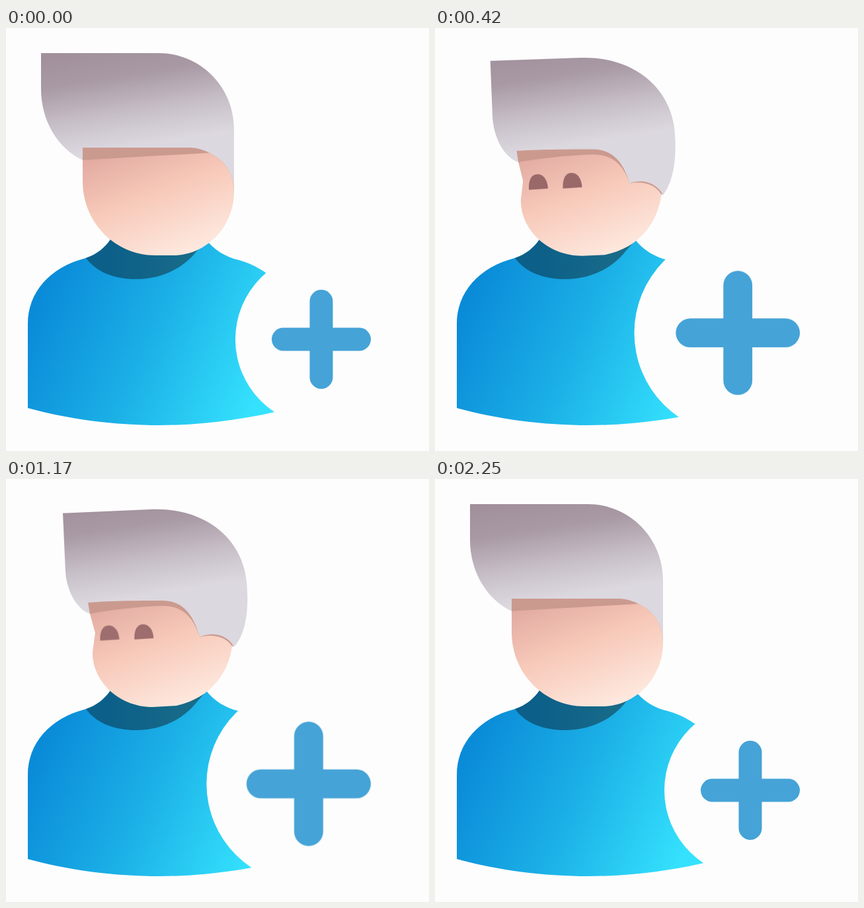
These frames come from a looping animation (640x640 px, 2.33 s). An HTML page without scripts:

```html
<!DOCTYPE html>
<html lang="en">
<head>
<meta charset="utf-8">
<title>Add user</title>
<style>
html, body { margin: 0; width: 100%; height: 100%; overflow: hidden; background: #fdfdfd; }
svg { display: block; width: 100%; height: 100%; }
.hair, .fringe, .skin, .bite, .plus, .eye { animation: 2330ms infinite; }
.hair { animation-name: hair; }
.fringe { animation-name: fringe; }
.skin { animation-name: skin; }
.bite { animation-name: bite; fill: #fdfdfd; }
.plus { animation-name: plus; transform-origin: 552px 509.5px; stroke: #45a3d7; stroke-width: 35; stroke-linecap: round; }
.eye { fill: #996869; transform-box: fill-box; transform-origin: 50% 100%; }
.left { animation-name: left; }
.right { animation-name: right; }

/* rest, turning, turned, turning back, rest */
@keyframes hair {
  0%, 71%, 100% { d: path("M53 38L231 38C294 38 345 89 345 153C345 190 345 220 345 248L230 260L116 200C78 182 53 140 53 92Z"); animation-timing-function: ease-in; }
  10.73% { d: path("M74 41L226 41C298 41 357 95 357 165C357 195 352 225 345 247L230 260L123 199C92 185 74 150 74 98Z"); animation-timing-function: ease-out; }
  22.5%, 49.5% { d: path("M86 52L218 46C302 42 365 92 365 170C367 208 360 238 345 254L230 260L127 204C105 197 91 165 90 140Z"); animation-timing-function: ease-in; }
  57.1% { d: path("M86 43L225 43C302 42 364 93 364 168C364 204 357 235 344 254L230 260L128 199C100 188 86 150 86 100Z"); animation-timing-function: ease-in-out; }
}
@keyframes fringe {
  0%, 71%, 100% { d: path("M116 181C170 181 230 181 278 181C290 181 302 185 313 192C332 202 345 222 345 248L230 260L116 201Z"); animation-timing-function: ease-in; }
  10.73% { d: path("M121 181C160 181 210 181 247 181C275 181 290 190 301 219C318 215 335 227 345 247L230 260L123 200Z"); animation-timing-function: ease-out; }
  22.5%, 49.5% { d: path("M124 187C160 184 210 184 238 184C268 185 283 205 293 239C312 231 333 235 344 252L230 260L127 204Z"); animation-timing-function: ease-in; }
  57.1% { d: path("M124 181C160 181 215 181 250 181C275 182 288 200 301 235C318 228 336 237 344 253L230 260L128 200Z"); animation-timing-function: ease-in-out; }
}
@keyframes skin {
  0%, 71%, 100% { d: path("M116 200C180 196 250 192 307 189C309 190 311 191 313 192C332 202 345 222 345 248C345 301 303 344 253 344L226 344C165 344 116 294 116 232L116 216Z"); animation-timing-function: ease-in; }
  10.73% { d: path("M123 199C160 195 215 190 250 190C280 191 292 201 301 219C318 217 335 229 345 247C340 298 302 343 253 344L226 344C170 344 125 304 125 252L126 225Z"); animation-timing-function: ease-out; }
  22.5%, 49.5% { d: path("M127 204C160 198 210 192 240 192C270 193 284 212 293 239C312 234 333 238 342 253C337 290 314 330 258 343L222 345C168 345 130 303 131 262L135 233Z"); animation-timing-function: ease-in; }
  57.1% { d: path("M128 199C165 194 220 190 248 190C275 191 289 208 301 235C318 231 335 240 343 254C338 296 300 342 253 344L226 344C170 344 128 302 129 260L132 228Z"); animation-timing-function: ease-in-out; }
}
@keyframes bite {
  0%, 66%, 100% { cx: 479px; cy: 471px; r: 132px; animation-timing-function: ease-in-out; }
  10.73% { cx: 457px; cy: 462px; r: 158px; animation-timing-function: ease-in-out; }
  22.5%, 48.5% { cx: 455px; cy: 461px; r: 152.5px; animation-timing-function: ease-in-out; }
}
@keyframes plus {
  0%, 66%, 100% { transform: none; animation-timing-function: ease-in-out; }
  20.5%, 48.5% { transform: scale(1.26); animation-timing-function: ease-in-out; }
  1.5% { transform: none; animation-timing-function: ease-in-out; }
}
@keyframes left {
  0%, 10.8%, 63%, 100% { transform: translate(6px, -4px) rotate(4deg) scaleY(0); fill: #d0a096; }
  19%, 49.5% { transform: none; fill: #996869; }
  28.8% { transform: translate(-1px, -1px); fill: #996869; }
  57.1% { transform: translate(5px, -4px) rotate(4deg) scaleY(.55); fill: #cf9f95; }
}
/* winks while turned */
@keyframes right {
  0%, 10.8%, 63%, 100% { transform: translate(9px, -2px) rotate(4deg) scaleY(0); fill: #d0a096; }
  19%, 22%, 45%, 49.5% { transform: none; fill: #996869; }
  28.8%, 35% { transform: translate(-1px, -4px) scaleY(.17); fill: #996869; }
  57.1% { transform: translate(9px, -2px) rotate(4deg) scaleY(.55); fill: #cf9f95; }
}
</style>
</head>
<body>
<svg viewBox="0 0 640 640">
  <defs>
    <linearGradient id="hairFill" gradientUnits="userSpaceOnUse" x1="0" y1="40" x2="31" y2="235">
      <stop offset="0" stop-color="#9f8e99"/>
      <stop offset=".3" stop-color="#a899a4"/>
      <stop offset=".6" stop-color="#c8c0c9"/>
      <stop offset=".85" stop-color="#dcd8df"/>
    </linearGradient>
    <linearGradient id="skinFill" gradientUnits="userSpaceOnUse" x1="0" y1="245" x2="66.4" y2="420">
      <stop offset="0" stop-color="#e2aaa1"/>
      <stop offset=".45" stop-color="#f7c9b9"/>
      <stop offset="1" stop-color="#fee9df"/>
    </linearGradient>
    <linearGradient id="shirtFill" gradientUnits="userSpaceOnUse" x1="235" y1="0" x2="567.6" y2="149.7">
      <stop offset="0" stop-color="#0a8bd8"/>
      <stop offset=".5" stop-color="#1cb1e7"/>
      <stop offset="1" stop-color="#35e2fd"/>
    </linearGradient>
    <linearGradient id="collarFill">
      <stop offset=".2" stop-color="#0c5f88"/>
      <stop offset=".9" stop-color="#196c88"/>
    </linearGradient>
  </defs>

  <path fill="url(#shirtFill)" d="M33 575V448C33 400 66 362 121 348C137 343 150 332 158 320L200 300H270L302 319C314 336 334 347 352 351C400 364 432 400 432 448V575C365 592 298 601 232 601C165 601 95 592 33 575Z"/>
  <path fill="url(#collarFill)" d="M158 320C150 332 137 343 121 348C137 370 165 380 197 380C235 380 268 364 289 337L303 321L230 300Z"/>
  <circle class="bite" cx="479" cy="471" r="132"/>
  <path class="plus" d="M419.5 471H534.5M477 413.5V528.5"/>

  <path class="hair" fill="url(#hairFill)"/>
  <path class="fringe" fill="#cb9a8f"/>
  <path class="skin" fill="url(#skinFill)"/>
  <path class="eye left" d="M142 245l29-2c-1-15-8-22-16-22c-9 0-14 9-13 24z"/>
  <path class="eye right" d="M193.500 243l29-2c-1-15-8-22-16-22c-9 0-14 9-13 24z"/>
</svg>
</body>
</html>
```
